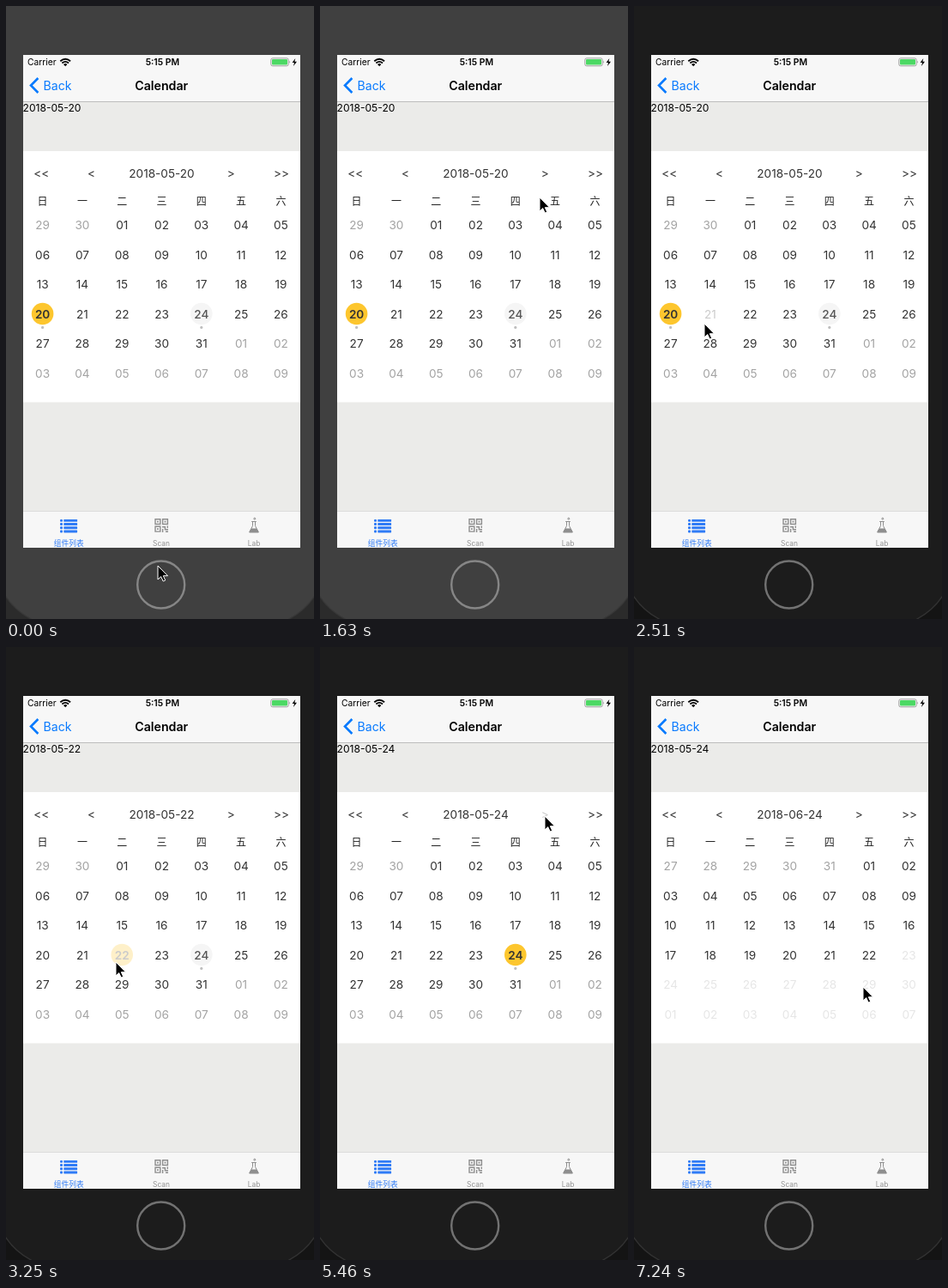
An HTML page that plays this animation: 359x714 px, repeating every 8000 ms.

```html
<!DOCTYPE html>
<html lang="en">
<head>
<meta charset="utf-8">
<title>Calendar</title>
<style>
  html, body { margin: 0; width: 100%; height: 100%; overflow: hidden; background: #404040; }
  svg { display: block; width: 359px; height: 714px; font-family: Inter, "Noto Sans CJK SC", "Noto Sans CJK", sans-serif; }
  .mid { text-anchor: middle; }
  .cal { font-size: 13.6px; fill: #333; }
  .week { font-size: 12px; fill: #222; font-family: "Noto Sans CJK SC", "Noto Sans CJK", sans-serif; }
  .tab { font-size: 8.4px; fill: #929292; }
</style>
</head>
<body>
<svg viewBox="0 0 359 714">
  <rect id="back" width="359" height="714"/>
  <path id="body" d="M-2 -2H361V685Q349 705 326 716H33Q10 705 -2 685Z" stroke-width="1.2"/>
  <circle id="home" cx="180.7" cy="674" r="27.5" fill="none" stroke-width="2.4"/>

  <rect x="20" y="57" width="323" height="574" fill="#ebebe9"/>
  <rect x="20" y="57" width="323" height="54" fill="#f7f7f7"/>
  <rect x="20" y="111" width="323" height="1" fill="#bdbdbd"/>
  <rect x="20" y="169" width="323" height="292.5" fill="#fff"/>
  <rect x="20" y="588" width="323" height="43" fill="#f7f7f7"/>
  <rect x="20" y="588" width="323" height=".7" fill="#d2d2d2"/>

  <!-- status bar -->
  <text x="25" y="69" font-size="10.3">Carrier</text>
  <g fill="none" stroke="#000" stroke-width="1.8">
    <path d="M63.3 64.2Q69.2 59.2 75.1 64.2"/>
    <path d="M65.4 66.5Q69.2 63.2 73 66.5"/>
  </g>
  <path d="M67 68Q69.2 66.2 71.4 68L69.2 70.2Z"/>
  <text class="mid" x="182.3" y="69" font-size="10.4" font-weight="600">5:15 PM</text>
  <rect x="308.8" y="60.8" width="20.4" height="9" rx="2" fill="#f7f7f7" stroke="#8a8a8a" stroke-width=".8"/>
  <rect x="310" y="62" width="18" height="6.6" rx="1" fill="#4cd964"/>
  <path d="M330.3 63.8Q332 65.3 330.3 66.8Z" fill="#8a8a8a"/>
  <path d="M337.3 61L333.6 66H336.1L335 70L339 64.8H336.4Z"/>

  <!-- navigation bar -->
  <path d="M37.4 84L29 92.5L37.4 101" fill="none" stroke="#087afe" stroke-width="2.6"/>
  <text x="43.6" y="98" font-size="14.1" fill="#087afe">Back</text>
  <text class="mid" x="181.2" y="98" font-size="14.2" font-weight="600">Calendar</text>

  <text id="picked" x="19.5" y="123.3" font-size="12.1"></text>

  <!-- calendar -->
  <g class="cal mid">
    <text x="41.3" y="200">&lt;&lt;</text>
    <text x="99.5" y="200">&lt;</text>
    <text id="title" x="181.5" y="200"></text>
    <text id="next" x="262.3" y="200">&gt;</text>
    <text x="321" y="200">&gt;&gt;</text>
  </g>
  <g id="week" class="week mid"></g>
  <g id="days" class="cal mid"></g>

  <!-- tab bar -->
  <g id="list" fill="#2f7bf6"></g>
  <text class="tab mid" x="73.2" y="629" style="fill:#2f7bf6;font-size:8.7px">组件列表</text>
  <g fill="none" stroke="#8e8e8e" stroke-width="1.4">
    <path d="M174 597.7h5.8v5.8h-5.8zM182.6 597.7h5.8v5.8h-5.8zM174 606.3h5.8v5.8h-5.8z"/>
    <path d="M176 600.6h1.8M184.6 600.6h1.8M176 609.2h1.8" stroke-width="1.8"/>
    <path d="M182 606.8h3.4v3h3.6M182.6 609v4M186 612.3h3M188.3 605.6v2.4"/>
  </g>
  <text class="tab mid" x="181" y="629">Scan</text>
  <g fill="none" stroke="#8e8e8e" stroke-width="1">
    <path d="M286.2 600.5h5.6M287.5 600.5v5L283.6 613h10.8L290.5 605.5v-5"/>
    <path d="M285.8 609h6.4L294 612.6h-10Z" fill="#8e8e8e"/>
    <circle cx="289.8" cy="597.2" r="1"/>
  </g>
  <text class="tab mid" x="289" y="629">Lab</text>

  <path id="cursor" d="M0 0V16L3.7 12.6L6.2 18L8.7 16.9L6.3 11.7H11.5Z" stroke="#fff" stroke-width="1" stroke-linejoin="round"/>
</svg>
<script>
const LOOP = 8000, DAY = 864e5;
// The screen refreshes in even ticks; all times below are tick counts.
const FIRST = 445, TICK = 147.4;
const FOCUS = 15, JUNE = 36;

const $ = id => document.getElementById(id);
const clamp = (v, lo, hi) => Math.min(hi, Math.max(lo, v));
const ease = u => u * u * (3 - 2 * u);
const two = n => String(n).padStart(2, "0");
const colX = i => 42.6 + 46.3 * i;
const rowY = i => 255.2 + 34.5 * i;

// Pointer moves, each a curve from the last end through a bend
const home = [177, 652];
const moves = [
  { from: 0, to: 4, bend: [165, 330], end: [127, 238] },
  { from: 4, to: 8, bend: [60, 175], end: [274, 203] },
  { from: 8, to: 14, bend: [150, 340], end: [82, 370] },
  { from: 16, to: 18, bend: [105, 369], end: [128, 367] },
  { from: 20, to: 23, bend: [175, 362], end: [221, 355] },
  { from: 25, to: 33, bend: [230, 320], end: [262, 197] },
  { from: 41, to: 45, bend: [306, 290], end: [275, 383] },
  { from: 46, to: 47, bend: [271, 390], end: [267, 396] }
];

const taps = [
  { item: 21, press: 15, release: 16 },
  { item: 22, press: 20, release: 20 },
  { item: 24, press: 25, release: 25 },
  { item: "next", press: 35, release: 35 }
];

function pointer(n) {
  let pos = home;
  for (const { from, to, bend, end } of moves) {
    if (n <= from) break;
    const u = ease(clamp((n - from) / (to - from), 0, 1)), v = 1 - u;
    pos = pos.map((p, k) => v * v * p + 2 * u * v * bend[k] + u * u * end[k]);
  }
  return pos;
}

// A pressed item dims at once and fades back after release.
function opacity(item, n) {
  const tap = taps.find(p => p.item === item);
  return !tap || n < tap.press ? 1 : clamp(.25 + .4 * (n - tap.release), .25, 1);
}

const pickedDay = n => taps.reduce((day, p) => p.item > 0 && n >= p.release ? p.item : day, 20);

function dayCell(i, month, n) {
  const first = Date.UTC(2018, month - 1, 1);
  const date = new Date(first + (i - new Date(first).getUTCDay()) * DAY);
  const d = date.getUTCDate(), inMonth = date.getUTCMonth() === month - 1;
  const disabled = date > Date.UTC(2018, 5, 22);
  const inMay = month === 5 && inMonth;
  const chosen = inMay && d === pickedDay(n), today = inMay && d === 24;
  const x = colX(i % 7), y = rowY(Math.floor(i / 7));
  const fill = disabled ? "#e6e6e6" : !inMonth ? "#a3a3a3" : today && !chosen ? "#555" : "#333";
  const weight = chosen ? 600 : today ? 500 : 400;
  const mark = chosen || today
    ? `<circle cx="${x}" cy="${y - .2}" r="12.8" fill="${chosen ? "#fdc62e" : "#f5f5f5"}"/>
       <circle cx="${x}" cy="${y + 15.7}" r="1.6" fill="#bfbfbf"/>` : "";
  return `<g opacity="${inMay ? opacity(d, n) : 1}">${mark}<text x="${x}" y="${y + 4.9}"
    fill="${fill}" font-weight="${weight}">${two(d)}</text></g>`;
}

$("week").innerHTML = [..."日一二三四五六"]
  .map((c, i) => `<text x="${colX(i)}" y="231.6">${c}</text>`).join("");

$("list").innerHTML = [0, 1, 2, 3].map(i => {
  const y = 597.9 + i * 4.2;
  return `<rect x="63" y="${y}" width="3" height="2.9" rx="1"/><rect x="67.3" y="${y}" width="15.8" height="2.9" rx=".6"/>`;
}).join("");

function draw(n) {
  const focused = n >= FOCUS, month = n >= JUNE ? 6 : 5, day = pickedDay(n);
  $("back").setAttribute("fill", focused ? "#141414" : "#2b2b2b");
  $("body").setAttribute("fill", focused ? "#1c1c1c" : "#404040");
  $("body").setAttribute("stroke", focused ? "#333" : "#383838");
  $("home").setAttribute("stroke", focused ? "#727272" : "#868686");
  $("picked").textContent = `2018-05-${day}`;
  $("title").textContent = `2018-${two(month)}-${day}`;
  $("next").setAttribute("opacity", opacity("next", n));
  $("days").innerHTML = Array.from({ length: 42 }, (_, i) => dayCell(i, month, n)).join("");
  $("cursor").setAttribute("transform", `translate(${pointer(n).map(Math.round)})`);
}

let start, shown;
function frame(now) {
  start ??= now;
  const t = (now - start) % LOOP;
  const n = Math.max(0, Math.floor((t - FIRST) / TICK) + 1);
  if (n !== shown) draw(shown = n);
  requestAnimationFrame(frame);
}
draw(0);
requestAnimationFrame(frame);
</script>
</body>
</html>
```
